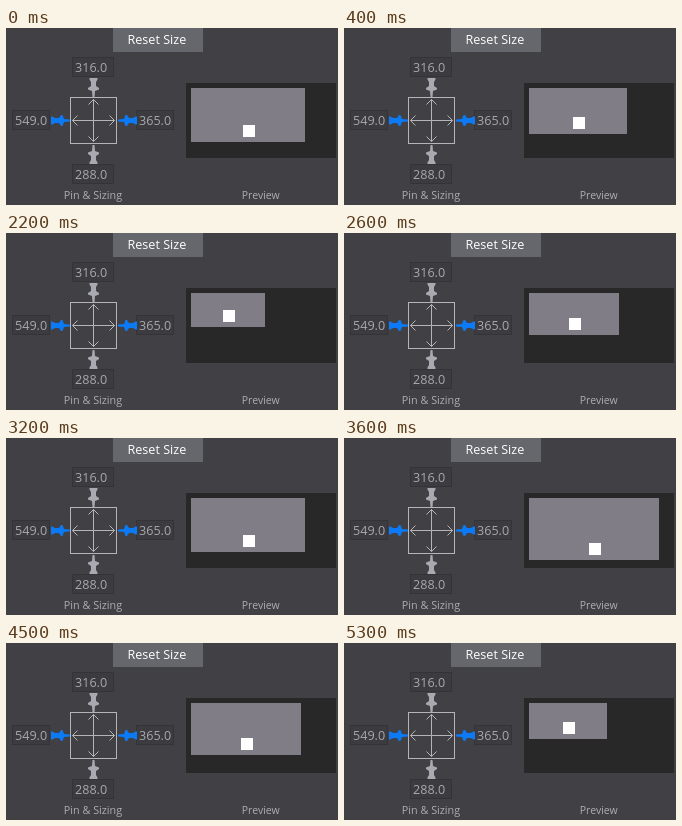
An HTML page that plays this animation: 332x177 px, repeating every 5.4 s.

```html
<!DOCTYPE html>
<html lang="en">
<head>
<meta charset="utf-8">
<title>Pin and sizing</title>
<style>
  html, body { margin: 0; width: 100%; height: 100%; overflow: hidden; background: #414045; }
  svg { display: block; width: 332px; height: 177px; }
  text { font: 12.6px "Open Sans", "Noto Sans", sans-serif; fill: #a8a9ae; }
  .button { fill: #fff; font-weight: 500; }
  .label { font-size: 10.8px; fill: #adaeb3; }
  .field { fill: #3c3b40; stroke: #343338; }
  .line { fill: none; stroke: #b5b5b8; }
  rect { shape-rendering: crispEdges; }
</style>
</head>
<body>
<svg viewBox="0 0 332 177">
  <defs>
    <!-- needle points along +x, origin at the outer end -->
    <path id="pin" d="M0-4 H1.5 L4-2.5 H8 L10-5.5 H11.5 L13-1.5 L19-1 V1 L13 1.5 L11.5 5.5 H10 L8 2.5 H4 L1.5 4 H0Z"/>
    <path id="arrow" class="line" d="M0 0 H21 M16-5 L21 0 L16 5"/>
  </defs>

  <rect x="107" width="90" height="24" fill="#65676c"/>
  <text class="button" x="121.5" y="16">Reset Size</text>

  <g id="fields"></g>
  <rect class="line" x="64.5" y="69.5" width="46" height="46"/>
  <g id="sides"></g>

  <text class="label" x="57.8" y="171">Pin &amp; Sizing</text>
  <text class="label" x="235.8" y="171" style="font-size:10.5px">Preview</text>

  <rect x="180" y="55" width="150" height="75" fill="#282828"/>
  <rect id="panel" x="185" y="60" fill="#807d87"/>
  <rect id="child" width="12" height="12" fill="#fff"/>
</svg>
<script>
  const $ = id => document.getElementById(id);
  const GREY = '#a9aab1', BLUE = '#0c79f5';

  // x, y, width, value
  const fields = [[66, 29, 42, '316.0'], [6, 82, 38, '549.0'], [130, 82, 38, '365.0'], [66, 136, 42, '288.0']];
  $('fields').innerHTML = fields.map(([x, y, width, value]) =>
    `<rect class="field" x="${x + .5}" y="${y + .5}" width="${width - 1}" height="19"/>
     <text x="${x + 3}" y="${y + 15}">${value}</text>`).join('');

  // pin x, pin y, pin angle, colour
  const sides = [[87.5, 50, 90, GREY], [45, 92.5, 0, BLUE], [131, 92.5, 180, BLUE], [87.5, 136, 270, GREY]];
  $('sides').innerHTML = sides.map(([x, y, angle, colour]) =>
    `<use href="#pin" fill="${colour}" transform="translate(${x} ${y}) rotate(${angle})"/>
     <use href="#arrow" transform="translate(87.5 92.5) rotate(${angle})"/>`).join('');

  const TICK = 100, LOOP = 5400;
  // [tick, panel width, change per tick]
  const moves = [
    [0, 114, -4], [4, 98, 0], [6, 94, -4], [12, 70, 0],
    [22, 74, 4], [30, 106, 0], [32, 114, 4], [38, 138, -4]
  ];

  function widthAt(tick) {
    const [start, width, step] = moves.filter(m => m[0] <= tick).pop();
    return width + step * (tick - start);
  }

  function place(el, attrs) {
    for (const name in attrs) el.setAttribute(name, attrs[name]);
  }

  const began = performance.now();
  function draw() {
    const time = (performance.now() - began) % LOOP;
    const width = widthAt(Math.floor(time / TICK));
    const height = width / 2 - 3;
    place($('panel'), { width, height });
    // child stays centred, with a fixed gap to the bottom edge
    place($('child'), { x: 180 + width / 2, y: 43 + height });
    requestAnimationFrame(draw);
  }
  draw();
</script>
</body>
</html>
```
